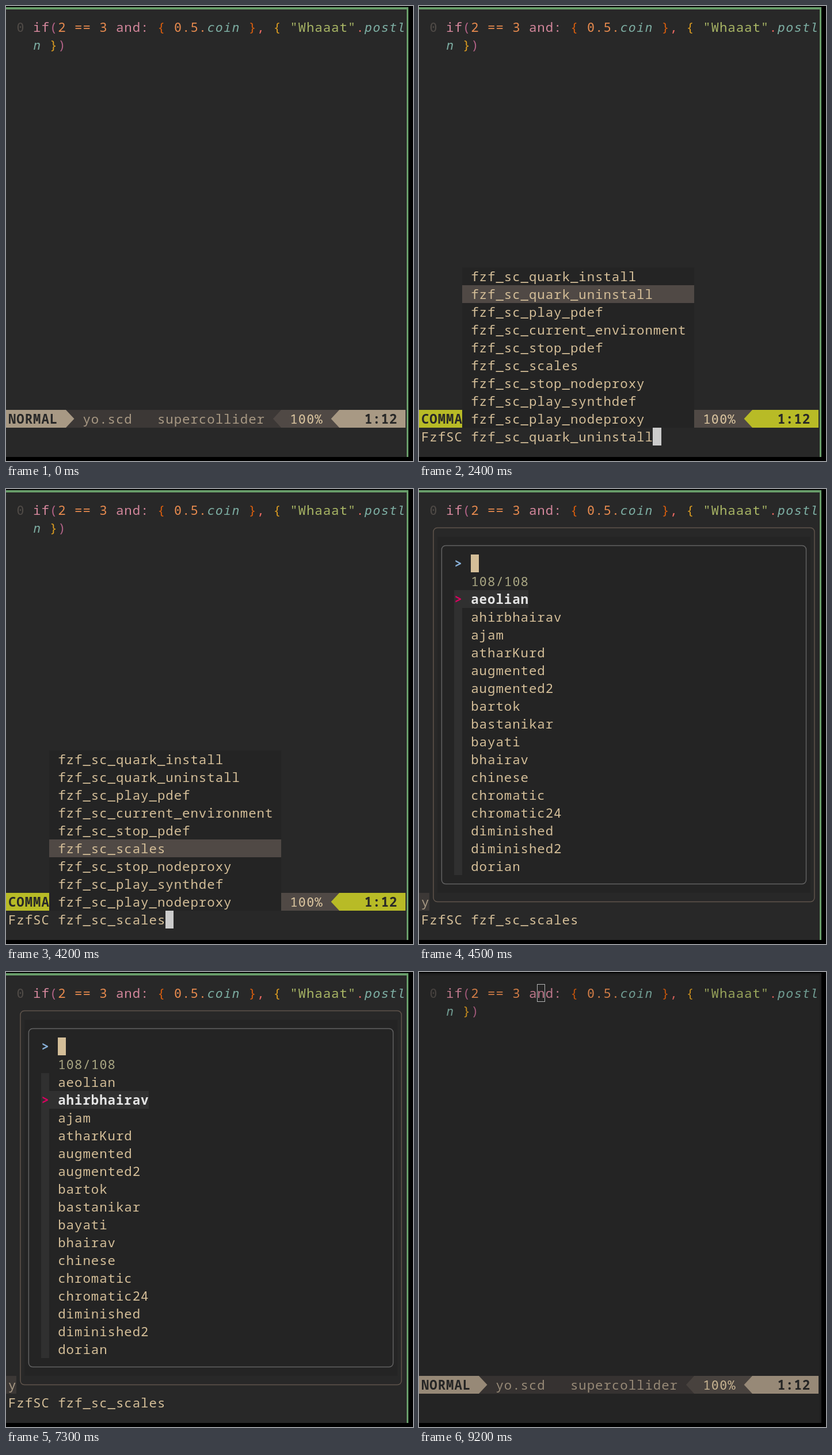
Recreate the animation shown at these times as an HTML page with a canvas. Size 707 px wide and 792 px high, loop 9.5 s.

```html
<!DOCTYPE html>
<html lang="en">
<head>
<meta charset="utf-8">
<title>Scale picker</title>
<style>
  html, body { margin: 0; width: 100%; height: 100%; overflow: hidden; background: #000; }
  canvas { display: block; }
</style>
</head>
<body>
<canvas id="stage" width="707" height="792"></canvas>
<script>
const ctx = document.getElementById('stage').getContext('2d');
const LOOP = 9500;
const CELL_W = 14.39, CELL_H = 31;
const colX = c => 3.4 + c * CELL_W;
const rowY = r => 21 + r * CELL_H;

const C = {
  bg: '#282828', float: '#242424', fg: '#d4be98', dark: '#282828',
  purple: '#d3869b', orange: '#e78a4e', red: '#ea6962', green: '#a9b665',
  blue: '#7daea3', paren: '#b16286', brace1: '#d65d0e', brace2: '#d79921',
  cursor: '#cccccc', select: '#504945', gutter: '#303030'
};

const CODE = [
  ['if', C.purple], ['(', C.paren], ['2 == 3 ', C.orange], ['and: ', C.purple],
  ['{ ', C.brace1], ['0.5.', C.orange], ['coin ', C.blue, 'italic'], ['}', C.brace1],
  [', ', C.red], ['{ ', C.brace2], ['"Whaaat"', C.green], ['.', C.red],
  ['postl', C.blue, 'italic']
];
const WRAPPED = [['n ', C.blue, 'italic'], ['}', C.brace2], [')', C.paren]];

const COMMANDS = ['quark_install', 'quark_uninstall', 'play_pdef', 'current_environment',
  'stop_pdef', 'scales', 'stop_nodeproxy', 'play_synthdef', 'play_nodeproxy']
  .map(s => 'fzf_sc_' + s);
const SCALES = ['aeolian', 'ahirbhairav', 'ajam', 'atharKurd', 'augmented', 'augmented2',
  'bartok', 'bastanikar', 'bayati', 'bhairav', 'chinese', 'chromatic', 'chromatic24',
  'diminished', 'diminished2', 'dorian'];

const KEY_TIMES = [500, 700, 800, 1300, 1500, 1800];
const TAB_TIMES = [2000, 2400, 2600, 2700, 2900, 3100];
const PICKS = [[6200, 1], [6400, 2], [6600, 3], [7000, 2], [7300, 1]];

const countPast = (times, t) => times.filter(x => t >= x).length;
const within = (t, a, b) => t >= a && t < b;

function box(x0, y0, x1, y1, color) {
  x0 = Math.round(x0); y0 = Math.round(y0);
  ctx.fillStyle = color;
  ctx.fillRect(x0, y0, Math.round(x1) - x0, Math.round(y1) - y0);
}

function cells(c0, r0, c1, r1, color) {
  box(colX(c0), rowY(r0), colX(c1), rowY(r1), color);
}

function text(str, col, row, color, style = '') {
  const y = rowY(row) + 24;
  ctx.fillStyle = color;
  ctx.textAlign = 'center';
  [...str].forEach((ch, i) => {
    // dotted zero and gently slanted italics
    ctx.font = style + (ch === '0' || style === 'italic'
      ? ' 21.6px "DejaVu Sans Mono", monospace'
      : ' 22.4px "Noto Sans Mono", monospace');
    ctx.fillText(ch, colX(col + i + 0.5), y);
  });
}

function spans(list, col, row) {
  for (const [str, color, style] of list) {
    text(str, col, row, color, style);
    col += str.length;
  }
}

function arrow(col, row, dir, color) {
  const base = colX(dir > 0 ? col : col + 1), tip = colX(dir > 0 ? col + 1 : col);
  const top = rowY(row), bottom = rowY(row + 1);
  ctx.fillStyle = color;
  ctx.beginPath();
  ctx.moveTo(Math.round(base), top);
  ctx.lineTo(tip, (top + bottom) / 2);
  ctx.lineTo(Math.round(base), bottom);
  ctx.fill();
}

function roundFrame(c0, r0, c1, r1, color) {
  const x = colX(c0 + 0.5), y = rowY(r0 + 0.5);
  ctx.strokeStyle = color;
  ctx.lineWidth = 1.5;
  ctx.beginPath();
  ctx.roundRect(x, y, colX(c1 + 0.5) - x, rowY(r1 + 0.5) - y, 7);
  ctx.stroke();
}

function statusLine(command) {
  const mode = command ? 'COMMAND' : 'NORMAL';
  const accent = command ? '#b8bb26' : '#a89984';
  const end = mode.length + 1, y0 = rowY(22), y1 = rowY(23);
  box(0, y0, colX(48), y1, command ? '#7c6f64' : '#3c3836');
  box(0, y0, colX(end), y1, accent);
  arrow(end, 22, 1, accent);
  text(mode, 0, 22, C.dark, 'bold');
  const info = command ? C.dark : '#a89984';
  text('yo.scd', end + 2, 22, info);
  text('supercollider', 18, 22, info);
  arrow(32, 22, -1, '#504945');
  cells(33, 22, 40, 23, '#504945');
  text('100%', 34, 22, '#ddc7a1');
  arrow(39, 22, -1, accent);
  cells(40, 22, 48, 23, accent);
  text('1:12', 43, 22, C.dark, 'bold');
}

function commandLine(t) {
  const tabs = countPast(TAB_TIMES, t);
  let line = 'FzfSC '.slice(0, countPast(KEY_TIMES, t));
  if (tabs) {
    line += COMMANDS[tabs - 1];
    cells(5, 14, 33, 23, C.float);
    cells(5, 13 + tabs, 33, 14 + tabs, C.select);
    COMMANDS.forEach((name, i) => text(name, 6, 14 + i, C.fg));
  }
  text(line, 0, 23, C.fg);
  if (!within(t, 3800, 4200)) {
    cells(line.length, 23, line.length + 1, 24, C.cursor);
  }
}

function picker(t) {
  box(0, rowY(22), colX(1), rowY(23), '#3c3836');
  text('y', 0, 22, '#a89984');
  text('FzfSC fzf_sc_scales', 0, 23, C.fg);
  cells(2, 2, 47, 22, C.float);
  roundFrame(1, 1, 47, 22, '#5f544b');
  if (t < 4500) return;

  roundFrame(2, 2, 46, 21, '#626262');
  text('>', 4, 3, '#87afd7', 'bold');
  cells(6, 3, 7, 4, C.fg);
  text('108/108', 6, 4, '#a8a582');
  cells(4, 5, 5, 21, C.gutter);
  const past = PICKS.filter(p => t >= p[0]);
  const pick = past.length ? past[past.length - 1][1] : 0;
  SCALES.forEach((name, i) => {
    const row = 5 + i;
    if (i === pick) {
      cells(4, row, 6 + name.length, row + 1, C.gutter);
      text('>', 4, row, '#d7005f', 'bold');
      text(name, 6, row, '#e4e4e4', 'bold');
    } else {
      text(name, 6, row, C.fg);
    }
  });
}

function normalCursor() {
  cells(14, 0, 15, 1, C.cursor);
  text('n', 14, 0, C.dark);
}

function hollowCursor() {
  ctx.strokeStyle = '#c8c8c8';
  ctx.lineWidth = 1;
  ctx.strokeRect(Math.round(colX(14)) + 0.5, rowY(0) + 0.5, 13, CELL_H - 1);
}

function draw(t) {
  const focused = t < 9200;
  box(0, 0, 707, 792, '#000');
  box(0, 2, 699, 785, focused ? '#689d6a' : '#1f1f1f');
  box(0, 6, 696, 785, C.bg);
  text('0', 1, 0, '#504b47');
  spans(CODE, 3, 0);

  if (within(t, 4400, 7700)) {
    picker(t);
  } else {
    const command = within(t, 300, 4400);
    spans(WRAPPED, 3, 1);
    statusLine(command);
    if (command) commandLine(t);
  }

  if (within(t, 200, 300) || within(t, 7700, 9000)) normalCursor();
  if (!focused) {
    hollowCursor();
    box(0, 6, 696, 785, 'rgba(0,0,0,0.1)');
  }
}

const start = performance.now();
function tick() {
  draw((performance.now() - start) % LOOP);
  requestAnimationFrame(tick);
}
tick();
</script>
</body>
</html>
```
